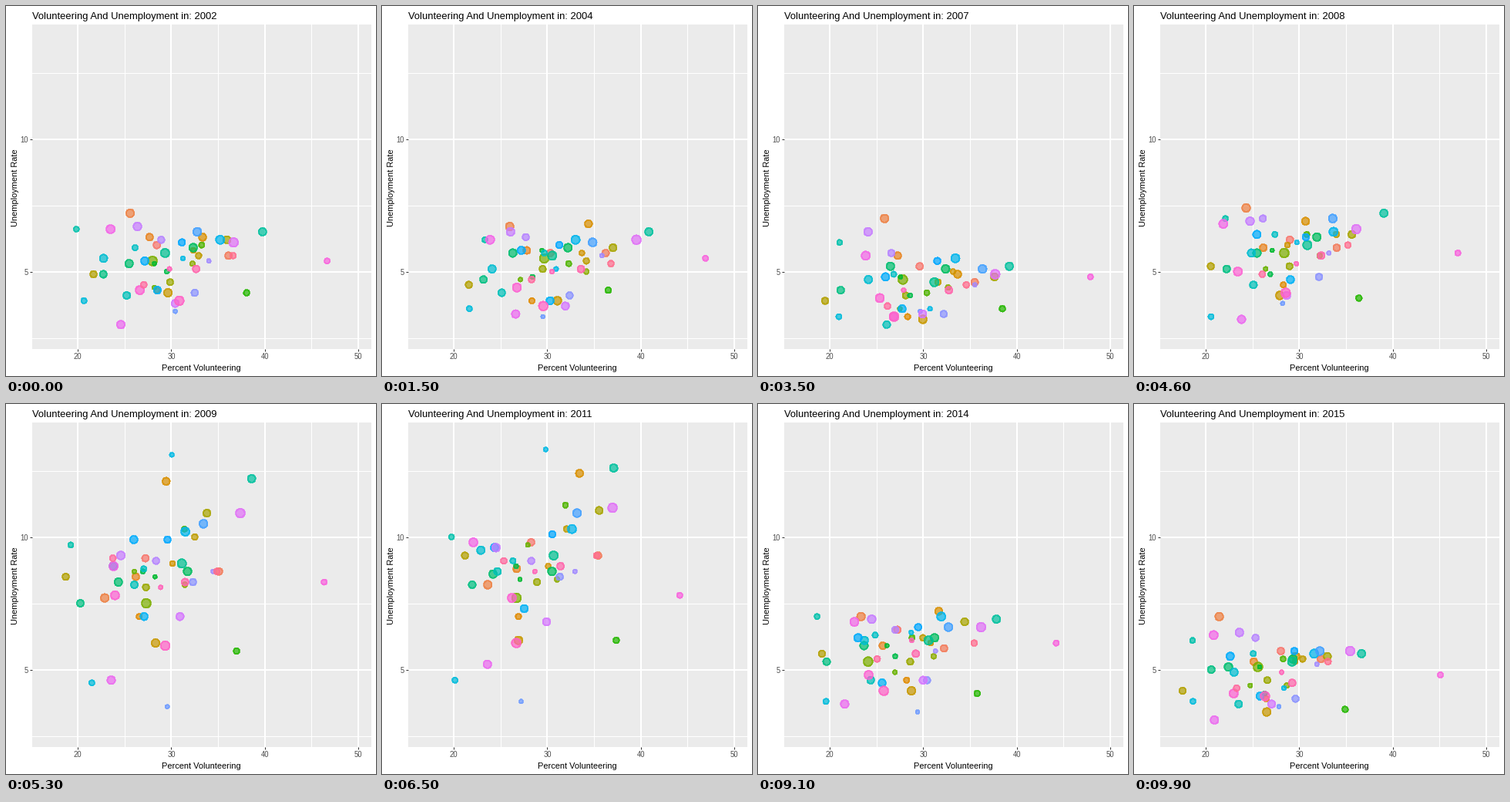
Animation of 480x480 px, one loop 10000 ms. Source, as a matplotlib script:

```python
import numpy as np
import matplotlib.pyplot as plt
from matplotlib.animation import FuncAnimation

plt.rcParams["font.family"] = "Liberation Sans"

W = H = 480
FRAMES, FIRST, SPAN, N = 100, 2002, 13, 51
LEFT, RIGHT, TOP, BOTTOM = 34, 474, 24, 445
BASE = 5

# Dots that stand out: home x, calm rate, response to the slump, radius.
LANDMARKS = {
    2: (23.7, 7.0, .3, 5.7),
    5: (31.5, 6.1, 1.7, 5.3),
    16: (36.2, 4.0, .55, 4.3),
    23: (38.6, 6.0, 1.8, 5.5),
    28: (20.5, 3.6, .3, 4),
    29: (29.5, 5.0, 2.3, 3.2),
    34: (33.5, 5.9, 1.3, 5.8),
    35: (29.3, 3.4, .1, 2.9),
    41: (37.0, 5.8, 1.45, 6.3),
    42: (23.8, 3.2, .5, 5.6),
    44: (46.0, 5.4, .7, 4),
    46: (28.3, 3.8, .6, 6.3),
}

rng = np.random.default_rng(11)
home = np.clip(rng.normal(28.6, 4.6, N), 19, 39)
calm = np.clip(rng.normal(BASE, .75, N), 3.8, 6.6)
gain = np.clip(rng.normal(1, .25, N), .5, 1.5)
radius = rng.uniform(2.8, 6.4, N)
for k, spec in LANDMARKS.items():
    home[k], calm[k], gain[k], radius[k] = spec


def hcl(h, c=100, l=65):
    """Polar CIELUV colour to sRGB."""
    u, v = c * np.cos(np.radians(h)), c * np.sin(np.radians(h))
    y = ((l + 16) / 116) ** 3
    u, v = u / (13 * l) + 0.1978, v / (13 * l) + 0.4683
    x = 9 * y * u / (4 * v)
    z = y * (12 - 3 * u - 20 * v) / (4 * v)
    m = np.array([[3.2405, -1.5371, -0.4985],
                  [-0.9693, 1.8760, 0.0416],
                  [0.0556, -0.2040, 1.0572]])
    rgb = np.clip(m @ [x, y, z], 0, 1)
    return np.where(rgb > .00304, 1.055 * rgb ** (1 / 2.4) - .055, 12.92 * rgb)


def layout(n):
    """Dot positions n years after the first."""
    level = np.interp(n, [0, 1, 4, 5, 6, 7, 8, 13], [5.2, 5.5, 4.4, 4.4, 5.5, 8.5, 8.7, 4.8])
    drift = np.interp(n, [0, 2, 6, 10, 13], [1, 1.6, 0, -.4, -1.5])
    x = home + drift + rng.normal(0, .9, N)
    y = calm + gain * (level - BASE) + rng.normal(0, .2, N)
    return np.column_stack([x, np.clip(np.round(y, 1), 2.6, 13.7)])


years = [layout(n) for n in range(SPAN + 1)]
starts = [round(n * (FRAMES - 1) / SPAN) for n in range(SPAN + 1)]

fig = plt.figure(figsize=(W / 72, H / 72), dpi=72, facecolor="white")
ax = fig.add_axes([LEFT / W, 1 - BOTTOM / H, (RIGHT - LEFT) / W, (BOTTOM - TOP) / H],
                  facecolor="#ebebeb")
ax.set(xlim=(15.11, 51.42), ylim=(2.08, 14.317),
       xticks=[20, 30, 40, 50], yticks=[5, 10])
ax.set_xticks([25, 35, 45], minor=True)
ax.set_yticks([2.5, 7.5, 12.5], minor=True)
ax.set_axisbelow(True)
ax.grid(which="major", color="white", lw=2)
ax.grid(which="minor", color="white", lw=1)
ax.tick_params(which="major", length=3, width=1, pad=2.5, color="#333333",
               labelcolor="#4d4d4d", labelsize=9.5)
ax.tick_params(which="minor", length=0)
for side in ax.spines.values():
    side.set_visible(False)


def label(x, y, text, size, **kw):
    return fig.text(x / W, 1 - y / H, text, fontsize=size, color="black", **kw)


label(253.5, 473, "Percent Volunteering", 11, ha="center")
label(12, 236, "Unemployment Rate", 11, rotation=90, ha="center", va="center")
title = label(34, 17, "", 13)

colors = [(*hcl(15 + 360 * k / (N + 1)), .7) for k in range(N)]
dots = ax.scatter(*years[0].T, s=(2 * radius - 1) ** 2, c=colors,
                  edgecolors=colors, linewidths=1, antialiased=False, zorder=3)


def update(i):
    # The title rounds to the nearest year; the dots wait for the year itself.
    title.set_text("Volunteering And Unemployment in: "
                   f"{FIRST + int(SPAN * i / (FRAMES - 1) + .5)}")
    dots.set_offsets(years[sum(s <= i for s in starts) - 1])
    return title, dots


anim = FuncAnimation(fig, update, frames=FRAMES, interval=1000 // 10,
                     init_func=lambda: update(0), repeat=True, repeat_delay=0)
plt.show()
```
